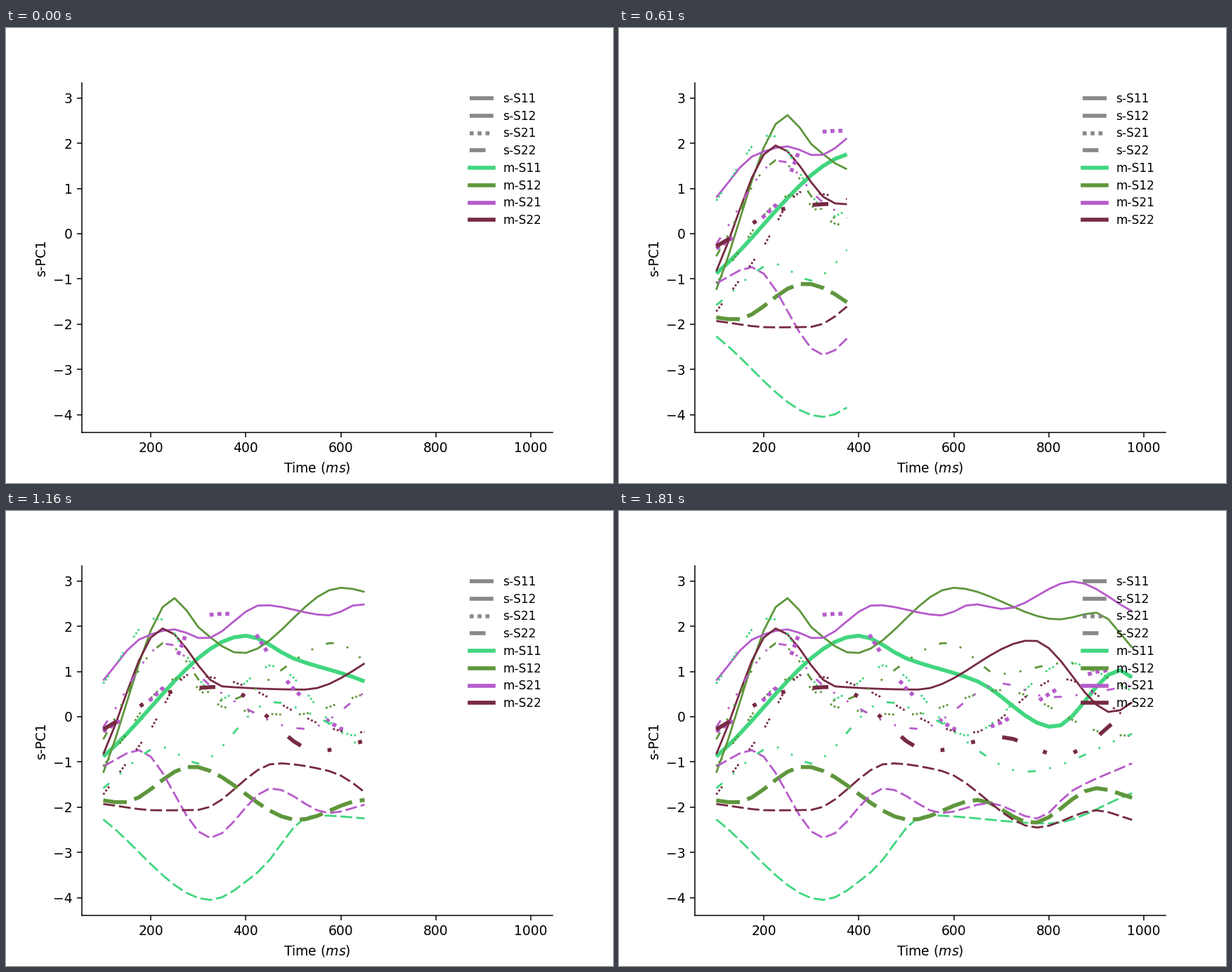
These frames come from a looping animation (864 by 648 pixels, 1860 ms). A matplotlib script:

```python
import numpy as np
import matplotlib.pyplot as plt
from matplotlib.animation import FuncAnimation
from matplotlib.lines import Line2D

LOOP, TICK = 1860, 10        # ms
HOLD, STEP = 110, 50         # ms before the first segment, ms per sample
T = np.arange(100, 1000, 25)

COLORS = {"S11": "#41d67f", "S12": "#5f963c", "S21": "#b65bcb", "S22": "#762a42"}
STYLES = {
    "S11": "-",
    "S12": (0, (6, 2)),
    "S21": (0, (1, 1, 1, 1, 1, 9)),
    "S22": (0, (4, 7, 1, 7, 1, 7)),
}

fig, ax = plt.subplots(figsize=(6.4, 4.8), dpi=135)
fig.subplots_adjust(bottom=1 / 9)
ax.set(xlim=(55, 1045), ylim=(-4.393, 3.34), xlabel="Time ($ms$)", ylabel="s-PC1")
ax.spines[["top", "right"]].set_visible(False)

curves = []


def ease(points):
    """Cubic easing through the points, flat at every turn."""
    x, v = np.array(points).T
    d = np.diff(v) / np.diff(x)
    a, b = d[:-1], d[1:]
    m = np.zeros(len(x))
    m[0], m[-1] = d[0], d[-1]
    same = a * b > 0
    m[1:-1][same] = 2 * a[same] * b[same] / (a + b)[same]
    i = np.clip(np.searchsorted(x, T, side="right") - 1, 0, len(d) - 1)
    h = x[i + 1] - x[i]
    s = (T - x[i]) / h
    bow = h * s * (1 - s) * ((1 - s) * m[i] - s * m[i + 1])
    return v[i] + (v[i + 1] - v[i]) * s * s * (3 - 2 * s) + bow


def trace(s, m, start, *turns, end):
    line, = ax.plot([], [], color=COLORS[m], ls=STYLES[s],
                    lw=3 if s == m else 1.5, solid_capstyle="butt")
    curves.append((line, ease([(T[0], start), *turns, (T[-1], end)])))


trace("S11", "S11", -.88, (400, 1.79), (500, 1.29), (650, .78), (810, -.23), (950, 1.03), end=.87)
trace("S11", "S12", -1.24, (250, 2.62), (300, 1.98), (390, 1.4), (600, 2.85), (820, 2.15),
      (900, 2.3), end=1.53)
trace("S11", "S21", .8, (180, 1.73), (250, 1.93), (312, 1.72), (435, 2.47), (575, 2.24),
      (640, 2.49), (705, 2.38), (850, 2.99), end=2.33)
trace("S11", "S22", -.83, (225, 1.95), (350, .67), (525, .6), (765, 1.69), (935, .09), end=.32)

trace("S12", "S11", -2.27, (325, -4.05), (425, -3.44), (540, -2.18), (800, -2.36), end=-1.69)
trace("S12", "S12", -1.85, (140, -1.9), (285, -1.1), (510, -2.28), (650, -1.84), (765, -2.35),
      (900, -1.58), end=-1.79)
trace("S12", "S21", -1.1, (175, -.74), (325, -2.68), (455, -1.58), (575, -2.13), (675, -1.91),
      (775, -2.25), (850, -1.63), end=-1.03)
trace("S12", "S22", -1.93, (215, -2.07), (300, -2.06), (465, -1.03), (575, -1.2), (775, -2.45),
      (900, -2.07), end=-2.28)

trace("S21", "S11", .73, (212, 2.2), (345, .38), (455, 1.14), (625, -.42), (840, 1.2), end=.57)
trace("S21", "S12", -1.09, (262, .87), (350, .22), (500, .04), (700, .59), (925, -.38), end=-.43)
trace("S21", "S21", -.33, (225, .63), (300, 2.22), (370, 2.28), (500, .62), (625, -.33),
      (930, 1.03), end=.9)
trace("S21", "S22", -1.72, (200, -.28), (275, .92), (350, .83), (635, -.36), (825, .85), end=-.1)

trace("S22", "S11", -1.58, (225, -.66), (295, -1.04), (455, .33), (540, .05), (750, -1.22),
      end=-.38)
trace("S22", "S12", -.5, (230, 1.63), (350, .34), (590, 1.64), (695, .94), (835, 1.19), end=.59)
trace("S22", "S21", -.23, (235, 1.64), (320, .72), (525, -.27), (700, .74), (800, .43), end=.68)
trace("S22", "S22", -.28, (250, .57), (350, .66), (550, -.76), (700, -.45), (825, -.86), end=.21)

keys = [Line2D([], [], color="#888888", ls=ls, lw=3, solid_capstyle="butt", label=f"s-{k}")
        for k, ls in STYLES.items()]
keys += [Line2D([], [], color=c, lw=3, label=f"m-{k}") for k, c in COLORS.items()]
ax.legend(handles=keys, loc="upper right", bbox_to_anchor=(1, 1.002),
          fontsize=9, labelspacing=.4, frameon=False)


def update(i):
    t = i * TICK
    n = 0 if t < HOLD else (t - HOLD) // STEP + 2
    for line, y in curves:
        line.set_data(T[:n], y[:n])
    return [line for line, _ in curves]


anim = FuncAnimation(fig, update, frames=LOOP // TICK, interval=TICK,
                     repeat=True, repeat_delay=0, blit=False)
plt.show()
```
